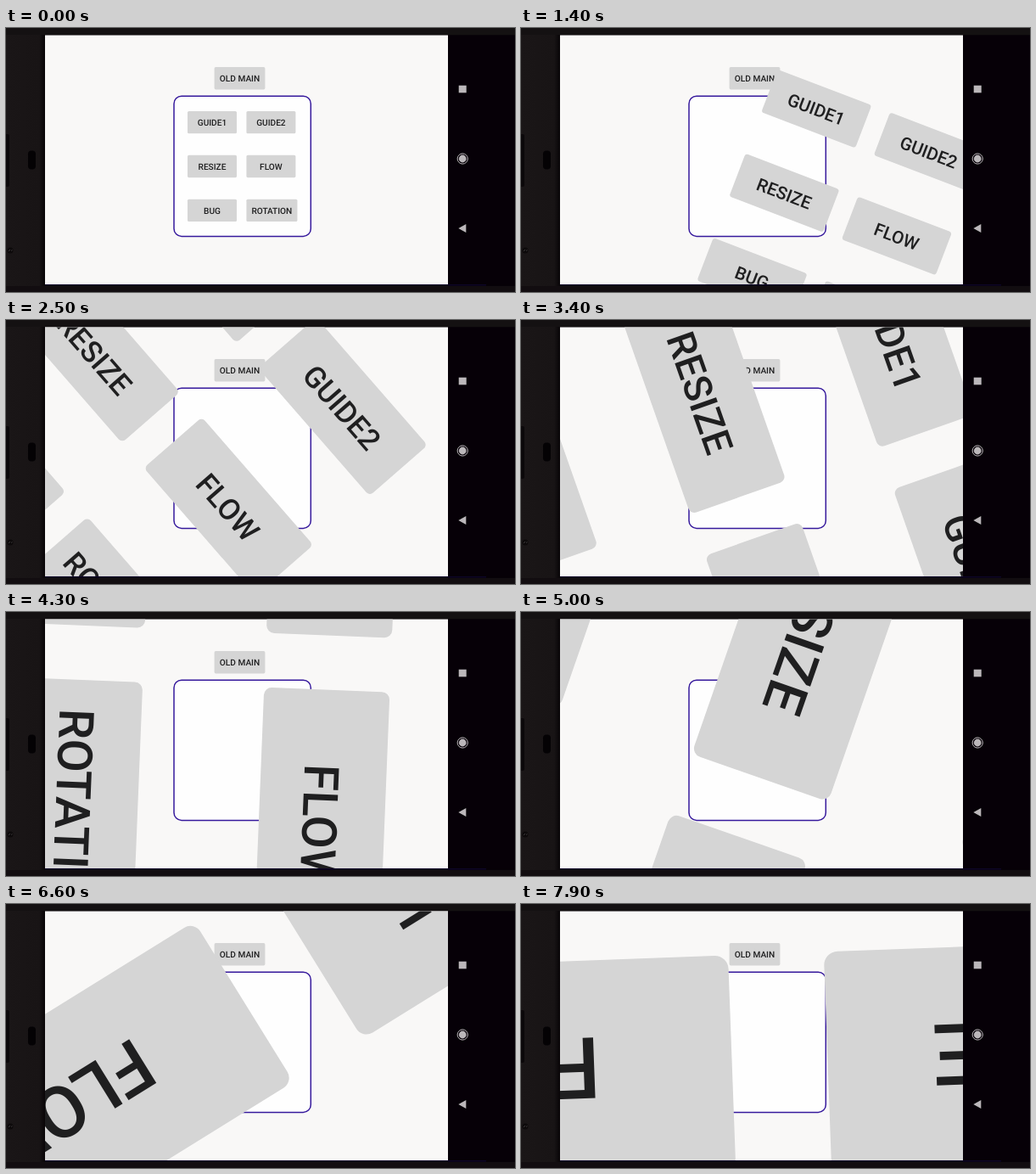
These frames come from a looping animation (600x311 px, 8000 ms). An HTML page:

```html
<!DOCTYPE html>
<html lang="en">
<head>
<meta charset="utf-8">
<title>Layer animation</title>
<style>
  html, body { margin: 0; width: 100%; height: 100%; overflow: hidden; background: #050006; }
  svg { display: block; width: 600px; height: 311px; }
  .btn rect { fill: #d5d5d5; }
  .btn text {
    font: 500 10.15px Roboto, "Noto Sans", sans-serif;
    fill: #1f1f20; text-anchor: middle; text-rendering: geometricPrecision;
  }
</style>
</head>
<body>
<svg viewBox="0 0 600 311">
  <defs>
    <clipPath id="screen"><rect x="46" y="8.5" width="475" height="293.5"/></clipPath>
    <linearGradient id="bezel">
      <stop offset="0" stop-color="#1a1617"/>
      <stop offset=".85" stop-color="#181415"/>
      <stop offset="1" stop-color="#080507"/>
    </linearGradient>
  </defs>

  <!-- phone body -->
  <rect width="600" height="311" fill="#060107"/>
  <rect width="600" height="8.5" fill="#141112"/>
  <rect y="8" width="46" height="296" fill="url(#bezel)"/>
  <rect y="304" width="600" height="7" fill="#120d10"/>
  <rect x="521" y="8.5" width="79" height="294" fill="#060007"/>
  <rect x="46" y="302" width="520" height="1.5" fill="#0d0526"/>
  <rect x="-4" y="125" width="8" height="62" rx="2" fill="#0b080a"/>
  <rect x="26" y="144.5" width="9" height="22" rx="4" fill="#040204"/>
  <circle cx="5" cy="262" r="3.5" fill="#0d0a0b"/>
  <path d="M3 263l2-2M6 262.5l1.5-1" stroke="#4b4748" stroke-width=".8"/>

  <!-- navigation bar -->
  <g fill="#bbb7ba">
    <rect x="533.7" y="67.7" width="9" height="8.6"/>
    <circle cx="538.2" cy="154" r="4.4"/>
    <circle cx="538.2" cy="154" r="6.1" fill="none" stroke="#bbb7ba"/>
    <path d="M533.3 236l9-5v10z"/>
  </g>

  <g clip-path="url(#screen)">
    <rect x="46" y="8" width="475" height="295" fill="#f9f8f7"/>
    <rect x="198" y="80.2" width="161.3" height="165.2" rx="9" fill="#fefefe" stroke="#35189c" stroke-width="1.5"/>
    <g id="fixed"></g>
    <g id="layer"></g>
  </g>
</svg>
<script>
  const LOOP = 8000, STEP = 100;
  const PIVOT = { x: 278.5, y: 163 }, SWING = 103;
  // [time in ms, rotation in degrees]
  const turns = [
    [300, 0], [450, 0.6], [600, 2.2], [700, 3.9], [800, 6.1],
    [1400, 20.9], [2500, 48.9], [4300, 92.3], [5700, 126.1], [6600, 148.2], [7900, 177.9]
  ];
  const fixed = document.getElementById("fixed");
  const layer = document.getElementById("layer");

  function make(tag, attrs, parent) {
    const el = document.createElementNS("http://www.w3.org/2000/svg", tag);
    for (const key in attrs) el.setAttribute(key, attrs[key]);
    return parent.appendChild(el);
  }

  function button(parent, label, x, cy, width) {
    const g = make("g", { class: "btn" }, parent);
    make("rect", { x, y: cy - 13.2, width, height: 26.4, rx: 1.65 }, g);
    make("text", { x: x + width / 2, y: cy + 4 }, g).textContent = label;
  }

  button(fixed, "OLD MAIN", 245.6, 59.3, 59.8);
  [["GUIDE1", "GUIDE2"], ["RESIZE", "FLOW"], ["BUG", "ROTATION"]].forEach(([left, right], row) => {
    const cy = 111.1 + row * 51.9;
    button(layer, left, 214, cy, 58);
    button(layer, right, 283.4, cy, right === "ROTATION" ? 60 : 58);
  });

  function angleAt(t) {
    if (t <= turns[0][0]) return 0;
    const i = turns.findIndex(([time]) => time >= t);
    const [t0, a0] = turns[i - 1], [t1, a1] = turns[i];
    return a0 + (a1 - a0) * (t - t0) / (t1 - t0);
  }

  const wave = deg => SWING * Math.sin(deg * Math.PI / 180);

  function draw(now) {
    const t = Math.floor((now % LOOP) / STEP) * STEP;
    const angle = angleAt(t);
    const scale = 1 + angle / 20;
    const x = PIVOT.x + wave(angle * 5), y = PIVOT.y + wave(angle * 7);
    layer.setAttribute("transform",
      `translate(${x} ${y}) rotate(${angle}) scale(${scale}) translate(${-PIVOT.x} ${-PIVOT.y})`);
  }

  const start = performance.now();
  function tick() {
    draw(performance.now() - start);
    requestAnimationFrame(tick);
  }
  tick();
</script>
</body>
</html>
```
